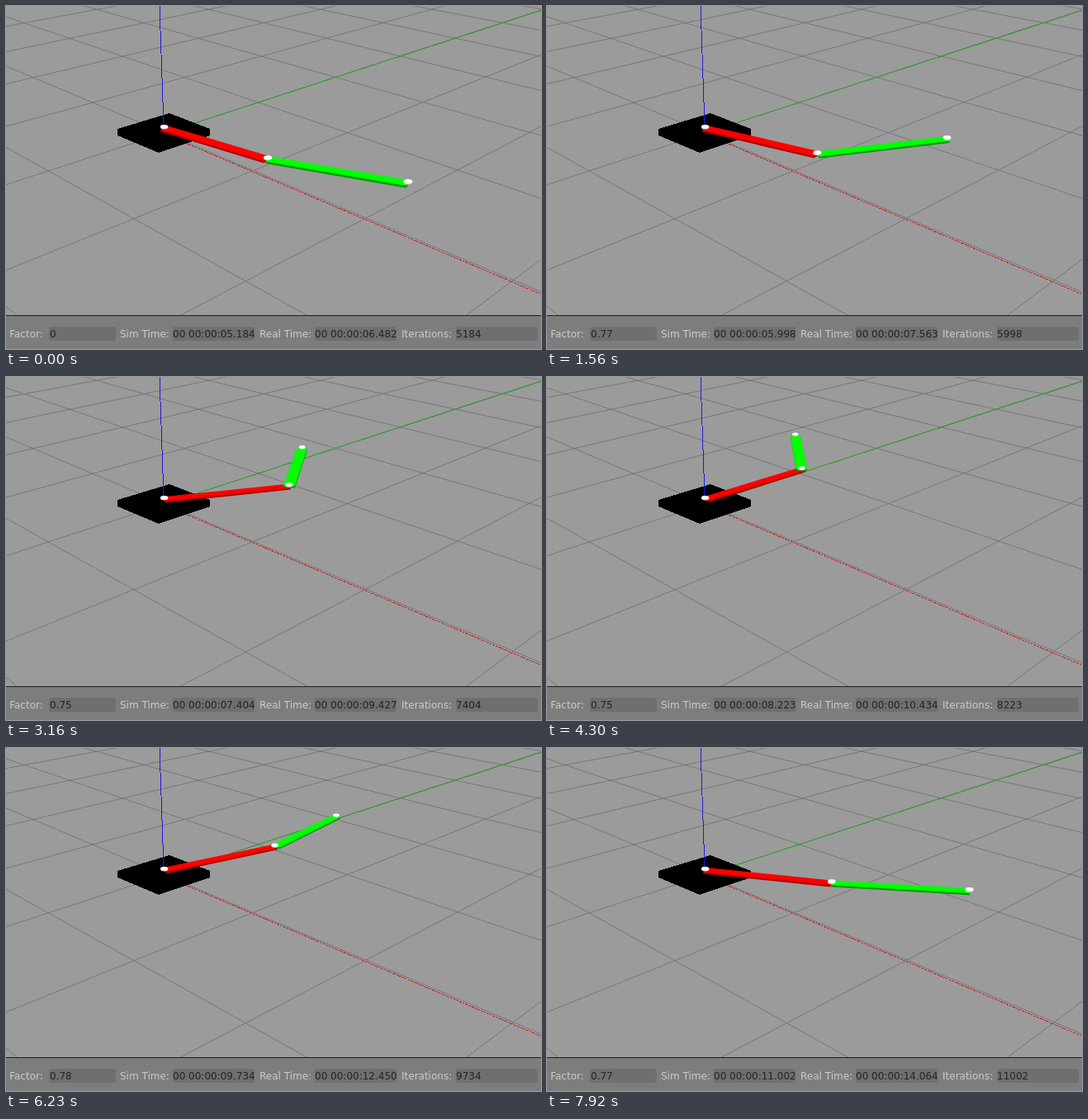
Write an HTML page that moves like this. It is 648 by 416 pixels and loops after 8000 ms.

```html
<!DOCTYPE html>
<html lang="en">
<head>
<meta charset="utf-8">
<title>Two-link arm simulation</title>
<style>
  html, body { margin: 0; width: 100%; height: 100%; overflow: hidden; background: #9b9b9b; }
  svg { display: block; width: 648px; height: 416px; }
  text { font: 12px "DejaVu Sans", sans-serif; white-space: pre; }
  .label { fill: #cbcbcb; }
  .value { fill: #242424; }
  .field { fill: #6f6f6f; }
  .line { fill: none; stroke-width: 1; shape-rendering: crispEdges; }
  .grid { fill: none; stroke: #6e6e6e; stroke-width: 0.8; }
</style>
</head>
<body>
<svg id="stage" viewBox="0 0 648 416" width="648" height="416"></svg>
<script>
const LOOP = 8000;
const LINK = 1.01;
const stage = document.getElementById('stage');

function add(tag, attrs, parent = stage, text = '') {
  const el = document.createElementNS('http://www.w3.org/2000/svg', tag);
  for (const k in attrs) el.setAttribute(k, attrs[k]);
  el.textContent = text;
  parent.appendChild(el);
  return el;
}

// Perspective of the ground plane; h lifts a point above it.
const depth = (x, y) => 1 - 0.1053 * x + 0.1073 * y;
function project([x, y], h = 0) {
  const w = depth(x, y);
  return [
    (192 + 76.1 * x + 146.2 * y - 0.05 * h) / w,
    (154 + 24.5 * x - 24.57 * y - h) / w
  ];
}
const join = pts => 'M' + pts.map(p => p.map(v => v.toFixed(2)).join(' ')).join('L');
const step = ([x, y], angle, r) => [x + r * Math.cos(angle), y + r * Math.sin(angle)];

// Floor grid, cut off before it passes the camera
add('rect', { width: 648, height: 376, fill: '#9b9b9b' });
const grid = add('g', { class: 'grid' });
for (let i = -10; i <= 10; i++) {
  const near = Math.max(-10, (0.1053 * i - 0.9) / 0.1073);
  const right = Math.min(10, (0.9 + 0.1073 * i) / 0.1053);
  add('path', { d: join([project([i, near]), project([i, 10])]) }, grid);
  add('path', { d: join([project([-10, i]), project([right, i])]) }, grid);
}

// World axes and base block
add('path', { class: 'line', d: 'M192 155.5L648 349.5', stroke: '#d81c1c', 'stroke-dasharray': '3 1' });
add('path', { class: 'line', d: 'M192 154L648 5.5', stroke: '#2aa42a' });
add('path', { d: 'M135 149L198 130L247 149V157L185 178L135 157Z', 'shape-rendering': 'crispEdges' });
add('path', { class: 'line', d: 'M186 0L191 146', stroke: '#1c1cd4' });

// Arm parts
function makeLink(side, top) {
  const parts = [add('path', { fill: side }), add('path', { fill: top })];
  return (start, angle) => {
    const end = step(start, angle, LINK);
    const across = angle + Math.PI / 2;
    const corners = [step(start, across, 0.047), step(start, across, -0.047),
      step(end, across, -0.047), step(end, across, 0.047)];
    const slab = h => join(corners.map(p => project(p, h))) + 'Z';
    parts[0].setAttribute('d', slab(4) + slab(5));
    parts[1].setAttribute('d', slab(6.2));
    return end;
  };
}
function makeCap() {
  const g = add('g', {});
  add('ellipse', { cy: 0.8, rx: 4.6, ry: 2.5, fill: '#c8c8c8' }, g);
  add('ellipse', { rx: 4.6, ry: 2.3, fill: '#fff' }, g);
  return p => {
    const [x, y] = project(p, 7.8);
    g.setAttribute('transform', `translate(${x} ${y}) scale(${1 / depth(...p)})`);
  };
}
const upper = makeLink('#b00000', '#ff0000');
const fore = makeLink('#009c00', '#00ff00');
const caps = [makeCap(), makeCap(), makeCap()];

// Status bar
add('rect', { y: 375, width: 648, height: 41, fill: '#7d7d7d' });
add('rect', { y: 375, width: 648, height: 1, fill: '#1c1c1c' });
function makeField(label, labelX, x, width, textX) {
  const box = { x, y: 389, width, height: 17, rx: 3 };
  const id = 'clip' + x;
  add('text', { x: labelX, y: 402, class: 'label' }, stage, label);
  add('rect', { ...box, class: 'field' });
  add('rect', box, add('clipPath', { id }));
  return add('text', { x: textX, y: 402, class: 'value', 'clip-path': `url(#${id})` });
}
const factorText = makeField('e Factor:', -7, 52, 81, 53);
const simText = makeField('Sim Time:', 138, 202, 99, 202);
const realText = makeField('Real Time:', 307, 374, 99, 374);
const iterText = makeField('Iterations:', 479, 545, 99, 545);

// The view refreshes in bursts: first time, last time, count
const bursts = [[500, 1310, 6], [1560, 2430, 6], [2520, 3160, 5], [3420, 4300, 6],
  [4460, 6230, 14], [6640, 6880, 3], [7290, 7920, 5]];
function lastRefresh(t) {
  const burst = bursts.filter(b => b[0] <= t).pop();
  if (!burst) return 0;
  const [from, to, count] = burst;
  const gap = (to - from) / (count - 1);
  return Math.min(to, from + gap * Math.floor((t - from) / gap + 1e-6));
}

// Headings in degrees, clocks in ms
const keys = [
  { t: 400, upper: 8.1, fore: 21.6, sim: 5184, real: 6482, factor: 0.76 },
  { t: 1560, upper: 14.2, fore: 61.3, sim: 5998, real: 7563, factor: 0.77 },
  { t: 2430, upper: 42.9, fore: 71.8, sim: 6746, real: 8572, factor: 0.75 },
  { t: 3160, upper: 61.4, fore: 127.4, sim: 7404, real: 9427, factor: 0.75 },
  { t: 4300, upper: 88.6, fore: 139.7, sim: 8223, real: 10434, factor: 0.75 },
  { t: 6230, upper: 77.3, fore: 100.7, sim: 9734, real: 12450, factor: 0.78 },
  { t: 7920, upper: 29.6, fore: 36, sim: 11002, real: 14064, factor: 0.77 }
];

const slope = (i, name) => (keys[i + 1][name] - keys[i][name]) / (keys[i + 1].t - keys[i].t);
// Harmonic mean of both sides, flat at turning points
function tangent(i, name) {
  const a = slope(Math.max(0, i - 1), name);
  const b = slope(Math.min(keys.length - 2, i), name);
  return a * b > 0 ? 2 * a * b / (a + b) : 0;
}
function sample(t) {
  let i = 0;
  while (i < keys.length - 2 && t >= keys[i + 1].t) i++;
  const p = keys[i], q = keys[i + 1], span = q.t - p.t;
  const u = Math.max(0, (t - p.t) / span);
  const linear = name => p[name] + (q[name] - p[name]) * u;
  const smooth = name => p[name] + (q[name] - p[name]) * u * u * (3 - 2 * u)
    + span * u * (1 - u) * (tangent(i, name) * (1 - u) - tangent(i + 1, name) * u);
  return { linear, smooth };
}

function clock(ms) {
  return '00 00:00:' + (ms / 1000).toFixed(3).padStart(6, '0');
}

function draw(t) {
  const { linear, smooth } = sample(t);
  const base = [0, 0];
  const elbow = upper(base, smooth('upper') * Math.PI / 180);
  const tip = fore(elbow, smooth('fore') * Math.PI / 180);
  [base, elbow, tip].forEach((p, i) => caps[i](p));

  const sim = Math.round(linear('sim'));
  factorText.textContent = t < 500 ? '0' : linear('factor').toFixed(2);
  simText.textContent = clock(sim);
  realText.textContent = clock(Math.round(linear('real')));
  iterText.textContent = sim;
}

const start = performance.now();
function tick() {
  draw(lastRefresh((performance.now() - start) % LOOP));
  requestAnimationFrame(tick);
}
tick();
</script>
</body>
</html>
```
